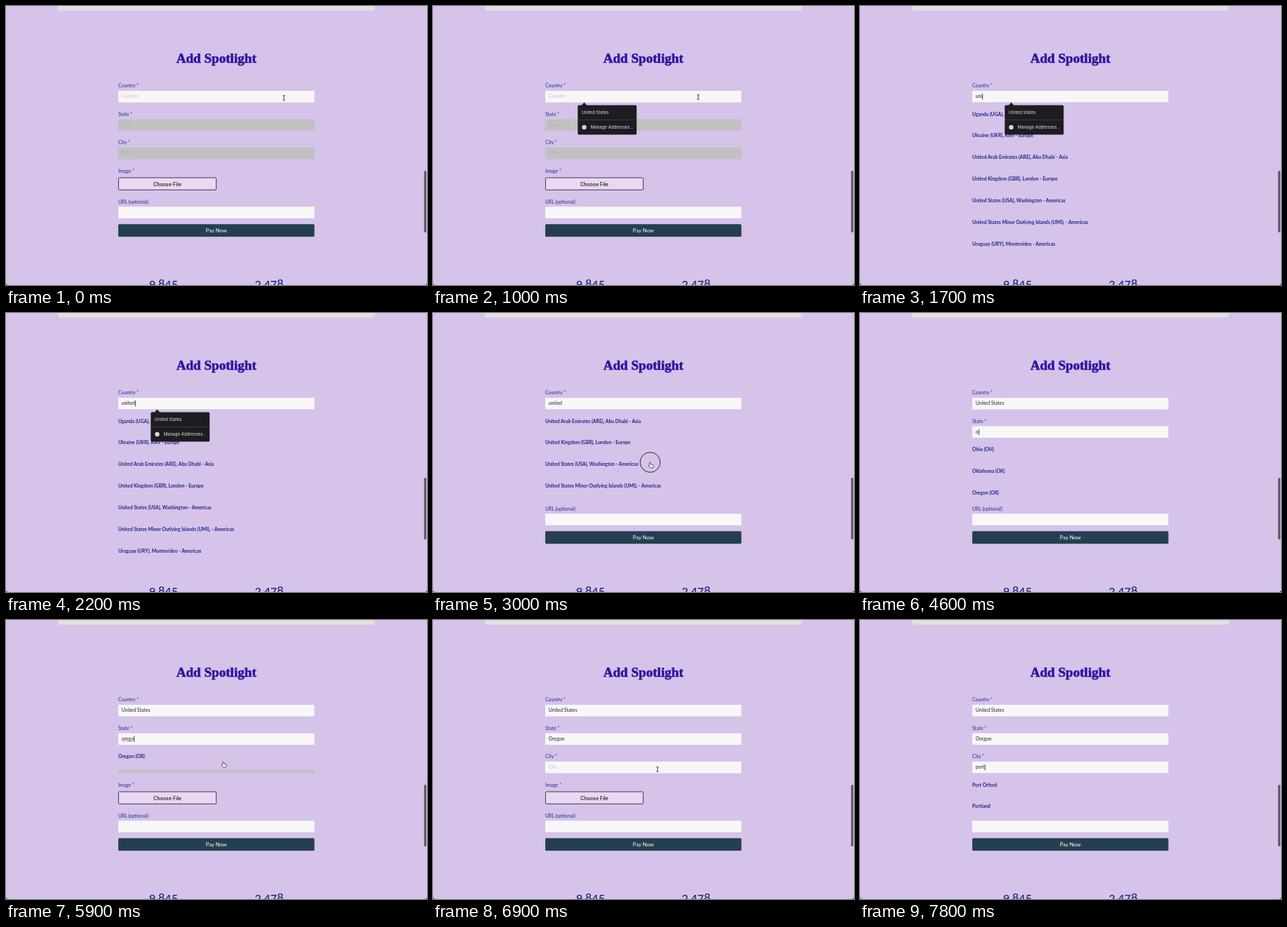
An HTML page that plays this animation: 600 by 398 pixels, repeating every 8 s.

```html
<!DOCTYPE html>
<html lang="en">
<head>
<meta charset="utf-8">
<title>Add Spotlight</title>
<style>
  html, body { margin: 0; width: 100%; height: 100%; overflow: hidden; background: #d5c3ea; }
  svg { display: block; width: 600px; height: 398px; font: 6.9px Lato, sans-serif; }
  .label { fill: #292a8e; }
  .row { fill: #202589; font-weight: 700; font-size: 6.8px; }
  .title { fill: #2d15a1; stroke: #2d15a1; stroke-width: .6; font: bold 19.1px "Liberation Serif", serif; }
  .count { fill: #252884; font: 600 16px Lato, sans-serif; }
  .choose { fill: #111; font: 500 7.1px Inter, sans-serif; }
  .pay { fill: #fff; font-size: 7.7px; }
  .menu { fill: #e6e4e8; font: 6.1px Inter, sans-serif; }
  .mid { text-anchor: middle; }
</style>
</head>
<body>
<svg id="stage" viewBox="0 0 600 398"></svg>
<script>
const LOOP = 8000, BG = '#d5c3ea';
const stage = document.getElementById('stage');
const pen = document.createElement('canvas').getContext('2d');
pen.font = '6.9px Lato, sans-serif';

const rect = (x, y, w, h, fill, more = '') =>
  `<rect x="${x}" y="${y}" width="${w}" height="${h}" fill="${fill}" ${more}/>`;
const text = (x, y, s, cls = '', more = '') =>
  `<text x="${x}" y="${y}" class="${cls}" ${more}>${s}</text>`;

// Value of the last [time, value] entry that has been reached
const at = (steps, t) => steps.reduce((v, [time, next]) => t >= time ? next : v, steps[0][1]);
const within = (t, spans) => spans.some(([a, b]) => t >= a && t < b);

const united = ['United Arab Emirates (ARE), Abu Dhabi - Asia', 'United Kingdom (GBR), London - Europe',
  'United States (USA), Washington - Americas', 'United States Minor Outlying Islands (UMI), - Americas'];
const startsU = ['Uganda (UGA), Kampala - Africa', 'Ukraine (UKR), Kiev - Europe', ...united,
  'Uruguay (URY), Montevideo - Americas'];

const fields = [
  { name: 'Country', y: 121, opens: 0,
    typed: [[0, ''], [1400, 'u'], [1500, 'un'], [1700, 'uni'], [1900, 'unit'], [2000, 'unite'],
      [2200, 'united'], [3200, 'United States']],
    list: [[0, []], [1500, startsU], [2300, united], [3200, []]],
    caret: [[500, 1000], [1400, 2900]] },
  { name: 'State', y: 161.5, opens: 3200,
    typed: [[0, ''], [4400, 'o'], [4800, 'or'], [5000, 'ore'], [5400, 'oreg'], [5600, 'orego'], [6300, 'Oregon']],
    list: [[0, []], [4500, ['Ohio (OH)', 'Oklahoma (OK)', 'Oregon (OR)']], [5000, ['Oregon (OR)']], [6300, []]],
    caret: [[3200, 3500], [4000, 6100]] },
  { name: 'City', y: 202, opens: 6300,
    typed: [[0, ''], [7400, 'p'], [7500, 'po'], [7600, 'por'], [7800, 'port']],
    list: [[0, []], [7600, ['Port Orford', 'Portland']]],
    caret: [[7000, 8000]] }
];

const mousePath = [[0, 396, 131], [100, 396, 131], [400, 378, 130], [2200, 378, 130], [2800, 309.5, 213],
  [5600, 309.5, 213], [5900, 309.5, 202], [6400, 309.5, 202], [6800, 320, 213], [8000, 320, 213]];
const pointer = [[0, 'beam'], [1400, ''], [2300, 'beam'], [2400, 'hand'], [3200, 'arrow'], [4400, ''],
  [5700, 'hand'], [6300, 'beam'], [7400, '']];
const presses = [[400, 600], [2900, 3200], [6100, 6300], [7000, 7200]];

const shapes = {
  '': '',
  beam: '<path d="M-1.5-3.5Q0-3.5 0-2.5Q0-3.5 1.5-3.5M0-2.5V2.5M-1.5 3.5Q0 3.5 0 2.5Q0 3.5 1.5 3.5" fill="none" stroke="#222" stroke-width=".9"/>',
  arrow: '<path d="M0 0V6L1.4 4.8L2.4 7L3.5 6.5L2.5 4.4H4.3Z" fill="#111" stroke="#fff" stroke-width=".4"/>',
  hand: '<path d="M-.9.6Q0-.6.8.6V3L3.6 3.5Q4.8 3.8 4.7 5L4.2 7.8H0L-2.3 5Q-2.3 3.8-.9 4.6Z" fill="#fff" stroke="#222" stroke-width=".7"/>'
};

function mouse(t) {
  const i = Math.max(1, mousePath.findIndex(p => p[0] > t));
  const [t0, x0, y0] = mousePath[i - 1], [t1, x1, y1] = mousePath[i];
  const k = (t - t0) / (t1 - t0), e = k * k * (3 - 2 * k);
  const x = x0 + (x1 - x0) * e, y = y0 + (y1 - y0) * e;
  const ring = within(t, presses) ? '<circle r="14.3" fill="none" stroke="#2b2533"/>' : '';
  return `<g transform="translate(${x} ${y})">${ring}${shapes[at(pointer, t)]}</g>`;
}

function input(f, t) {
  const value = at(f.typed, t), open = t >= f.opens, base = f.y + 10.3;
  let out = text(160, f.y - 4.8, f.name + ' *', 'label') +
    rect(160, f.y, 279.5, 16.5, open ? '#f7f7f8' : '#c1c0c2') +
    text(164.7, base, value || f.name, '', `fill="${value ? '#25232a' : open ? '#c6c4c9' : '#b3b2b6'}"`);
  const end = 165 + pen.measureText(value).width;
  if (value.startsWith('oreg'))
    out += `<path d="M165 ${base + 1.6}H${end}" stroke="#888" stroke-width=".6" stroke-dasharray="1 .6"/>`;
  if (within(t, f.caret)) out += rect(end, f.y + 4, .8, 8.5, '#222');
  return out;
}

function list(f, t) {
  const rows = at(f.list, t), top = f.y + 16.5;
  if (!rows.length) return '';
  return rect(159, top, 282, 4.2 + 30.85 * rows.length, BG) +
    rows.map((s, i) => text(160, top + 19.1 + 30.85 * i, s, 'row')).join('');
}

const popup = '<path d="M211.5 142L215.5 137.6L219.5 142Z" fill="#1e1c20"/>' +
  rect(206.3, 141.5, 83.9, 42, '#1e1c20', 'rx="1.5"') + rect(206.3, 162.3, 83.9, .6, '#57545b') +
  text(211.8, 154.4, 'United States', 'menu') +
  '<circle cx="215.5" cy="173" r="3.2" fill="#d8d6da"/>' + text(224.8, 175.2, 'Manage Addresses...', 'menu');

const page = rect(0, 0, 600, 398, BG) + rect(74, -6, 451.5, 12.7, '#e0dfe1', 'rx="3"') +
  text(299.7, 81, 'Add Spotlight', 'title mid') +
  text(160, 238, 'Image *', 'label') +
  rect(160.4, 245, 139.2, 17.3, '#e9d8f1', 'rx="1.2" stroke="#302a3c" stroke-width=".9"') +
  text(230, 256.5, 'Choose File', 'choose mid') +
  text(160, 281.5, 'URL (optional)', 'label') + rect(160, 286.3, 279.5, 16.5, '#f7f7f8') +
  rect(160, 311.8, 279.5, 18, '#b3a4c5', 'rx="2"') + rect(160, 311.3, 279.5, 17.8, '#243f50', 'rx="1.5"') +
  text(299.8, 323, 'Pay Now', 'pay mid') +
  text(224.5, 400.5, '9,845', 'count mid', 'dy="2.5 0 -2.5 2.5 0"') +
  text(375, 400.5, '2,478', 'count mid', 'dy="2 0 .5 0 -2.5"');

const frame = rect(595.8, 235, 3.2, 88, '#66566f', 'rx="1.6"') +
  '<path d="M0 395Q0 398 3 398H0ZM600 395Q600 398 597 398H600Z" fill="#15121a"/>';

function draw(t) {
  stage.innerHTML = page + fields.map(f => input(f, t)).join('') + fields.map(f => list(f, t)).join('') +
    (within(t, [[500, 2900]]) ? popup : '') + mouse(t) + frame;
}

const start = performance.now();
let last = -1;
function tick() {
  const t = Math.floor((performance.now() - start) % LOOP / 100) * 100;
  if (t !== last) draw(last = t);
  requestAnimationFrame(tick);
}
tick();
</script>
</body>
</html>
```
